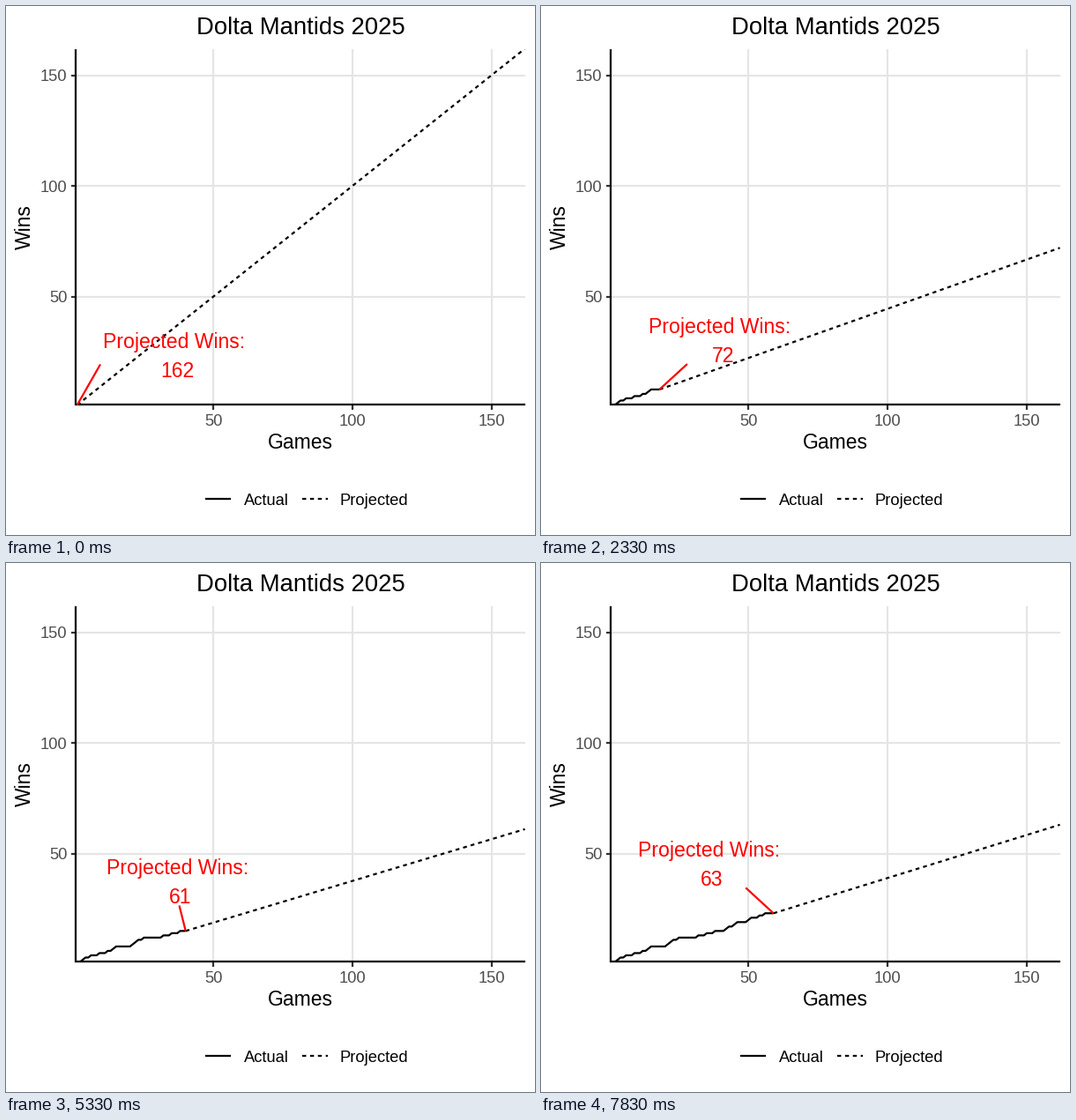
A matplotlib script that plays this animation: 600x600 px, repeating every 8 s.

```python
import math

import matplotlib.pyplot as plt
import numpy as np
from matplotlib.animation import FuncAnimation
from matplotlib.patches import Rectangle

FRAMES = 160
INTERVAL = 50
SEASON = 162
GAMES_PER_STEP = 122 / 99

WON = [1, 3, 4, 6, 9, 12, 14, 15, 21, 22, 23, 25, 32, 35, 38,
       42, 43, 45, 46, 50, 51, 54, 56]
TOTAL = np.cumsum([g in WON for g in range(1, 60)])

LEFT, RIGHT, TOP, BOTTOM = 79.3, 588.6, 48.6, 452.4
MID = (LEFT + RIGHT) / 2
LW = 2.22 * 0.72
DASH = (0, (2, 2))
RED = "#ff0000"

# Label centre over time: step, x
LABEL_T = [0, 6, 14, 20, 27, 28, 35, 47]
LABEL_X = [191, 198, 203, 228, 224.3, 200, 190.3, 190.3]
HALF_W = 80

plt.rcParams["font.family"] = "Liberation Sans"
fig = plt.figure(figsize=(6, 6), dpi=100, facecolor="white")
ax = fig.add_axes([0, 0, 1, 1])
ax.set_xlim(0, 600)
ax.set_ylim(600, 0)
ax.axis("off")


def px(game):
    return 235.3 + (game - 50) * 3.154


def py(wins):
    return 329.5 - (wins - 50) * 2.51


def line(xs, ys, color="black", z=2, style="-"):
    return ax.plot(xs, ys, color=color, lw=LW, ls=style, zorder=z,
                   solid_capstyle="butt", dash_capstyle="butt",
                   solid_joinstyle="round")[0]


def text(x, y, s, size, ha="center", color="black", **kw):
    return ax.text(x, y, s, fontsize=size * 0.72, ha=ha, color=color,
                   va="baseline", zorder=6, **kw)


def draw_static():
    for v in (50, 100, 150):
        x, y = px(v), py(v)
        line([x, x], [TOP, BOTTOM], "#e5e5e5", 1)
        line([LEFT, RIGHT], [y, y], "#e5e5e5", 1)
        line([x, x], [BOTTOM, BOTTOM + 5.7], "#333333", 4)
        line([LEFT - 5.7, LEFT], [y, y], "#333333", 4)
        text(x, 476.5, str(v), 18.33, color="#4d4d4d")
        text(69.5, y + 6.8, str(v), 18.33, "right", "#4d4d4d")
    line([LEFT, LEFT], [TOP, BOTTOM + 1], z=5)
    line([LEFT - 1, RIGHT], [BOTTOM, BOTTOM], z=5)

    text(MID, 32.3, "Dolta Mantids 2025", 27.5)
    text(MID, 502.3, "Games", 22.92)
    text(27.5, 250.5, "Wins", 22.92, rotation=90, rotation_mode="anchor")

    line([226.2, 255], [559.3, 559.3])
    line([336.2, 365], [559.3, 559.3], style=DASH)
    text(269.5, 566, "Actual", 18.33, "left")
    text(379, 566, "Projected", 18.33, "left")


def leader_end(x, y, cx):
    """Where the pointer from (x, y) meets the label box around cx."""
    x0, x1 = cx - HALF_W - 4, cx + HALF_W + 4
    edge, mid_y = y - 28.9, y - 56
    if x0 <= x <= x1:
        dx = cx + 3 - x
        return x + dx * 34 / math.hypot(dx, y - edge), edge
    ex = x0 if x < x0 else x1
    share = math.hypot(x - ex, y - edge) / math.hypot(x - ex, y - mid_y)
    return ex, edge + (mid_y - edge) * share


draw_static()
panel = Rectangle((LEFT, TOP), RIGHT - LEFT, BOTTOM - TOP + 1,
                  transform=ax.transData)
actual = line([], [], z=3)
projected = line([], [], z=3, style=DASH)
leader = line([], [], RED, z=6)
caption = text(0, 0, "Projected Wins:", 23, color=RED)
count = text(0, 0, "", 23, color=RED)
for item in (actual, projected):
    item.set_clip_path(panel)


def update(i):
    step = (3 * i + 2) // 10  # six steps a second
    game = round(1 + step * GAMES_PER_STEP)
    wins = TOTAL[game - 1]
    pace = round(wins / game * SEASON)
    x, y = px(game), py(wins)
    cx = np.interp(step, LABEL_T, LABEL_X)

    actual.set_data(px(np.arange(1, game + 1)), py(TOTAL[:game]))
    projected.set_data([x, px(SEASON)], [y, py(pace)])
    ex, ey = leader_end(x, y, cx)
    leader.set_data([ex, x], [ey, y])
    caption.set_position((cx, y - 64.4))
    count.set_position((cx + 3.2, y - 31.3))
    count.set_text(str(pace))
    return actual, projected, leader, caption, count


anim = FuncAnimation(fig, update, frames=FRAMES, interval=INTERVAL,
                     init_func=lambda: update(0), repeat=True, blit=False)
plt.show()
```
